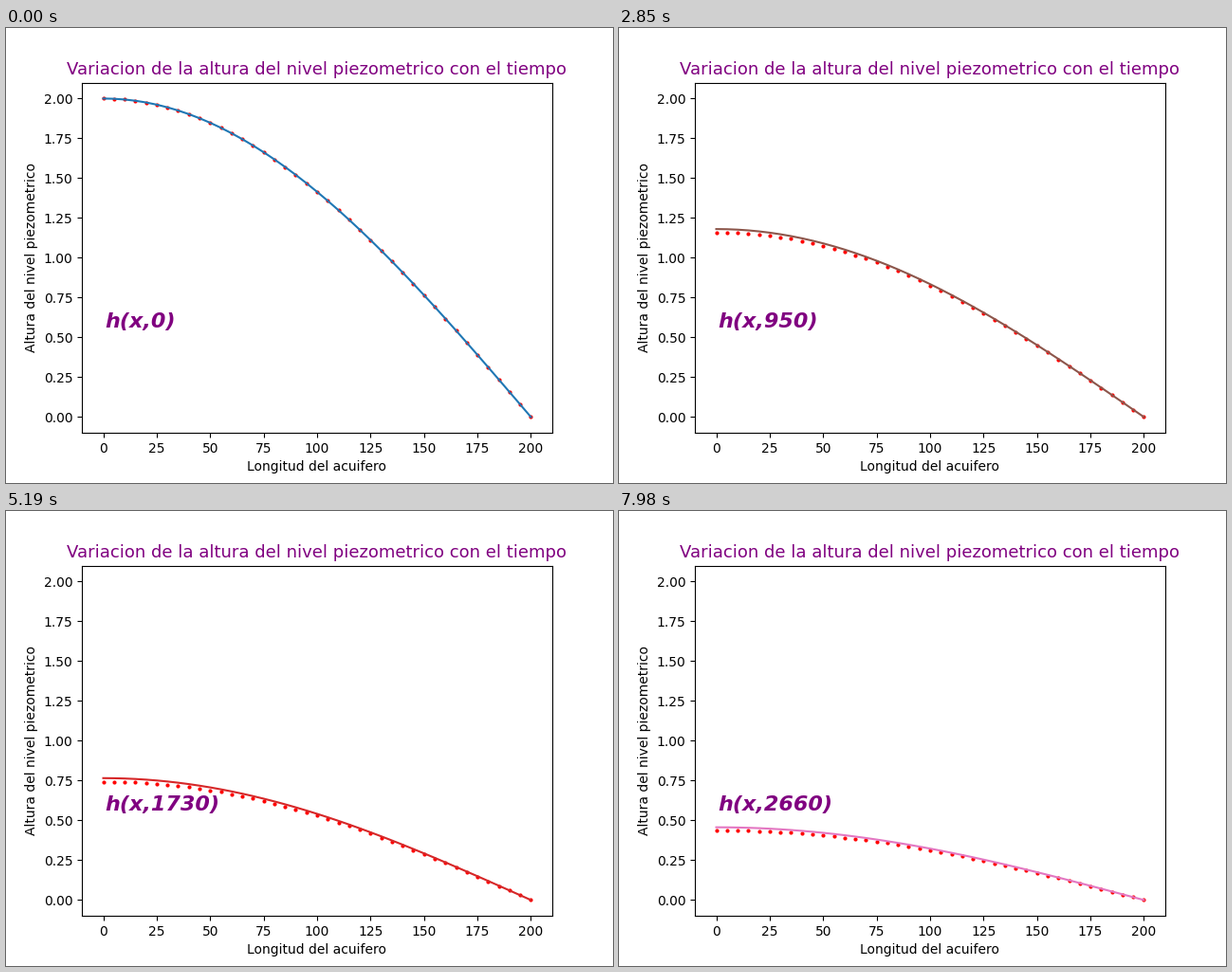
Recreate the animation shown at these times as a matplotlib script. Size 640 by 480 pixels, loop 8 s.

```python
import numpy as np
import matplotlib.pyplot as plt
from matplotlib.animation import FuncAnimation

LENGTH = 200        # aquifer length
DIFF = 9            # diffusivity
DX = 5
STEPS = 10          # unit time steps per frame
FRAMES = 267
LOOP_MS = 8000

x = np.arange(0, LENGTH + DX, DX)
start = 2 * np.cos(np.pi * x / (2 * LENGTH))


def exact(t):
    return start * np.exp(-DIFF * t * (np.pi / (2 * LENGTH)) ** 2)


def solve():
    """Explicit finite differences: no flow on the left, zero head on the right."""
    r = DIFF / DX ** 2
    h = start.copy()
    rows = [h.copy()]
    for _ in range(FRAMES - 1):
        for _ in range(STEPS):
            h[1:-1] += r * (h[2:] - 2 * h[1:-1] + h[:-2])
            h[0] = h[1]
        rows.append(h.copy())
    return rows


heads = solve()

fig, ax = plt.subplots(figsize=(6.4, 4.8), dpi=100)
ax.set_xlim(-10, 210)
ax.set_ylim(-0.1, 2.1)
ax.set_title("Variacion de la altura del nivel piezometrico con el tiempo",
             fontsize=13, color="purple")
ax.set_xlabel("Longitud del acuifero")
ax.set_ylabel("Altura del nivel piezometrico")

dots, = ax.plot(x, heads[0], "ro", markersize=2)
curve, = ax.plot(x, start, color="C0")
label = ax.text(1, 0.56, "", fontsize=16, color="purple",
                weight="bold", style="italic")


def update(n):
    t = n * STEPS
    dots.set_ydata(heads[n])
    curve.set_ydata(exact(t))
    curve.set_color(f"C{n % 10}")
    label.set_text(f"h(x,{t})")
    return dots, curve, label


anim = FuncAnimation(fig, update, frames=FRAMES, interval=LOOP_MS / FRAMES,
                     repeat=True, repeat_delay=0)
plt.show()
```
